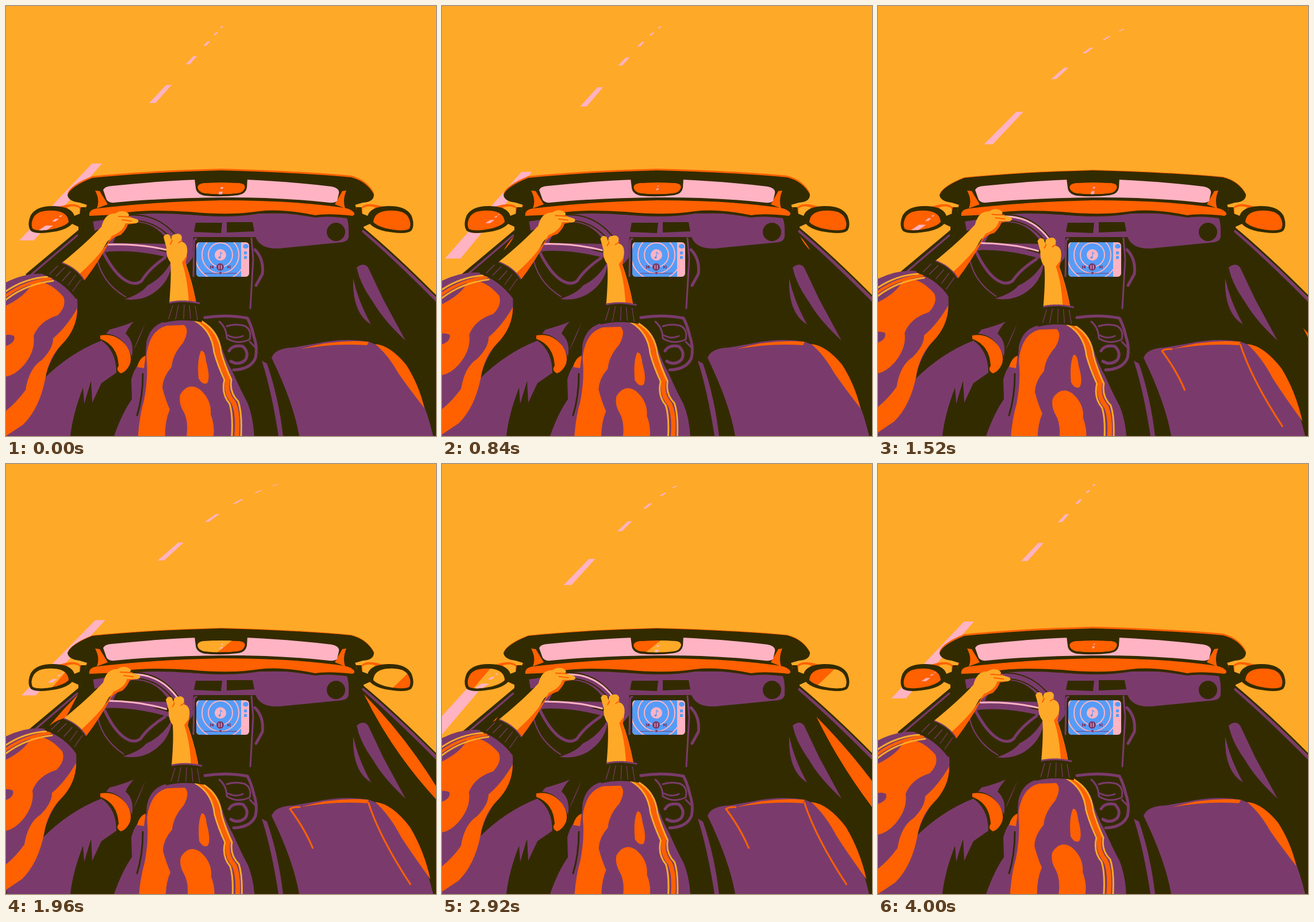
Recreate the animation shown at these times as an HTML page without scripts. Size 748 by 748 pixels, loop 4.04 s.

```html
<!DOCTYPE html>
<html lang="en">
<head>
<meta charset="utf-8">
<title>Evening drive</title>
<style>
/* a: dashes passed, b/c: road bend, s: steering, p: phase of the passing light */
@property --a { syntax: '<number>'; inherits: true; initial-value: 0; }
@property --b { syntax: '<number>'; inherits: true; initial-value: 0; }
@property --c { syntax: '<number>'; inherits: true; initial-value: 0; }
@property --s { syntax: '<number>'; inherits: true; initial-value: 0; }
@property --p { syntax: '<number>'; inherits: true; initial-value: 0; }

html, body { margin: 0; width: 100%; height: 100%; overflow: hidden; background: #ffa928; }
#stage {
  position: relative; width: 748px; height: 748px; overflow: hidden;
  animation: drive 4040ms infinite, steer 4040ms cubic-bezier(.37, 0, .63, 1) infinite, light 4040ms steps(20) infinite;
  --l: min(clamp(0, (var(--p) - .13) * 3.3, 1), (1 - var(--p)) * 10);
}
svg { position: absolute; left: 0; top: 0; display: block; }

@keyframes drive {
  0% { --a: 0; --b: 0; --c: 0; animation-timing-function: steps(21); }
  20.792% { --a: 3.054; --b: 0; --c: 4; animation-timing-function: steps(17); }
  37.623% { --a: 5.493; --b: 11.5; --c: 2; animation-timing-function: steps(11); }
  48.514% { --a: 6.99; --b: 18.5; --c: 1; animation-timing-function: steps(14); }
  62.376% { --a: 9.02; --b: 12.5; --c: 2; animation-timing-function: steps(21); }
  83.168% { --a: 11.757; --b: 0; --c: 3; animation-timing-function: steps(16); }
  99%, 100% { --a: 14; --b: 0; --c: 0; }
}
@keyframes steer {
  0%, 99%, 100% { --s: 0; }
  49.5% { --s: 1; }
}
/* five sweeps of 800 ms */
@keyframes light {
  0%, 19.8%, 39.6%, 59.4%, 79.2%, 99%, 100% { --p: 0; }
  19.795%, 39.595%, 59.395%, 79.195%, 98.995% { --p: 1; }
}

/* road dashes: z is the depth, u the near edge, v the far edge */
.dash {
  position: absolute; inset: 0; background: #ffb3c3;
  --z: calc(var(--n) + .97 - var(--a));
  --u: clamp(.3, var(--z) - .18, 6.2);
  --v: clamp(.3, var(--z) + .18, 6.2);
  --yu: calc(338 / var(--u) - 20);
  --yv: calc(338 / var(--v) - 20);
  --xu: calc(409 - .915 * var(--yu) + var(--b) * (var(--u) - 1) + var(--c) * (var(--u) + 6 / var(--u) - 6));
  --xv: calc(409 - .915 * var(--yv) + var(--b) * (var(--v) - 1) + var(--c) * (var(--v) + 6 / var(--v) - 6));
  clip-path: polygon(
    calc((var(--xu) - 10 / var(--u)) * 1px) calc(var(--yu) * 1px),
    calc((var(--xu) + 10 / var(--u)) * 1px) calc(var(--yu) * 1px),
    calc((var(--xv) + 10 / var(--v)) * 1px) calc(var(--yv) * 1px),
    calc((var(--xv) - 10 / var(--v)) * 1px) calc(var(--yv) * 1px));
}

.y { fill: #ffa928; } .o { fill: #ff6000; } .p { fill: #7a3b6c; }
.d { fill: #332b00; } .k { fill: #ffb3c3; } .b { fill: #559cf8; }
.line { fill: none; stroke: #7a3b6c; stroke-width: 5; stroke-linecap: round; stroke-linejoin: round; }
.sy { stroke: #ffa928; } .so { stroke: #ff6000; } .sd { stroke: #332b00; } .sk { stroke: #ffb3c3; } .sb { stroke: #559cf8; }
.w1 { stroke-width: 1.2; } .w2 { stroke-width: 2; } .w3 { stroke-width: 3; } .w8 { stroke-width: 8; }

#wheel { transform-origin: 235px 440px; transform: rotate(calc(var(--s) * 3deg)); }
#armL { transform: translate(calc(var(--s) * 3px), calc(var(--s) * -4px)); }
#sleeveL { transform: translate(calc(var(--s) * -2px), calc(var(--s) * -6px)); }
#armR { transform: translate(calc(var(--s) * 4px), calc(var(--s) * 8px)); }
#sleeveR { transform: translate(calc(var(--s) * 1px), calc(var(--s) * 8px)); }

#rim { transform: translateY(calc(var(--l) * 2px)); }
.lit { stroke-dasharray: 1 2; stroke-dashoffset: calc(1.05 - var(--l) * 1.05); stroke-linecap: butt; }
#crest { transform-origin: 642px 588px; transform: scale(calc(1 + var(--l) * .12), calc(1 + var(--l) * .2)); }
.glare { transform: translate(calc((var(--p) - .45) * 430px), calc((var(--p) - .45) * 20px)); }
.door {
  --gone: max(0, var(--p) - .57);
  transform-origin: 623px 401px;
  transform: translate(calc(var(--gone) * 354px), calc(var(--gone) * 483px)) scale(calc(min(var(--p), .57) * 6.8));
}
.away { animation: away 288.571ms steps(7) infinite; }
#backL { transform-origin: 104px 359px; }
#backC { transform-origin: 377px 309px; }
@keyframes away { to { transform: scale(.5); } }
</style>
</head>
<body>
<div id="stage">
<i class="dash" style="--n:0"></i><i class="dash" style="--n:1"></i><i class="dash" style="--n:2"></i>
<i class="dash" style="--n:3"></i><i class="dash" style="--n:4"></i><i class="dash" style="--n:5"></i>
<i class="dash" style="--n:6"></i><i class="dash" style="--n:7"></i><i class="dash" style="--n:8"></i>
<i class="dash" style="--n:9"></i><i class="dash" style="--n:10"></i><i class="dash" style="--n:11"></i>
<i class="dash" style="--n:12"></i><i class="dash" style="--n:13"></i><i class="dash" style="--n:14"></i>
<i class="dash" style="--n:15"></i><i class="dash" style="--n:16"></i><i class="dash" style="--n:17"></i>
<i class="dash" style="--n:18"></i><i class="dash" style="--n:19"></i><i class="dash" style="--n:20"></i>

<svg width="748" height="748" viewBox="0 0 748 748">
<defs>
  <path id="frame" d="M107 329Q112 314 150 299Q250 289 374 286Q500 289 600 298Q628 305 640 328Q640 341 621 342L607 346Q612 354 607 367L600 370Q560 364 538 368Q480 357 440 361Q390 370 320 363Q230 357 190 369L150 375L140 366Q137 354 141 346L128 342Q109 340 107 329Z"/>
  <path id="glass" d="M639 376Q640 358 664 356Q690 354 699 366Q706 377 702 387Q697 391 682 390Q650 387 639 376Z"/>
  <path id="leaf" class="o" d="M623 401Q652 430 675 472Q642 440 623 401Z"/>
  <clipPath id="inR"><use href="#glass"/></clipPath>
  <clipPath id="inL"><use href="#glass" transform="matrix(-1 0 0 1 748 0)"/></clipPath>
  <path id="rear" d="M333 315Q334 309 344 308Q374 306 406 308Q416 309 416 315Q414 325 402 326Q374 329 346 326Q334 324 333 315Z"/>
  <clipPath id="inC"><use href="#rear"/></clipPath>
  <clipPath id="inS"><rect x="331" y="411" width="78" height="60"/></clipPath>
  <clipPath id="inScreen"><rect x="331" y="411" width="92" height="60" rx="6"/></clipPath>
  <g id="side">
    <path class="o" d="M618 350Q626 342 644 346L660 350L634 366L620 364Z"/>
    <path class="y" d="M620 352Q628 346 642 350L632 366L620 364Z"/>
    <path class="d" d="M606 358Q618 360 629 365Q634 349 664 348Q695 347 705 364Q712 381 705 391Q697 397 674 394Q644 391 633 379L622 384L606 378Z"/>
    <use href="#glass" class="o"/>
  </g>
</defs>

<!-- cabin -->
<path class="d" d="M126 350V392L36 468L0 500V748H748V511L622 388V350Z"/>
<use href="#leaf" class="door"/>
<g transform="matrix(-1 0 0 1 748 0)"><use href="#leaf" class="door"/></g>
<path class="line" stroke-width="7" d="M622 392Q680 442 750 513"/>
<path class="line w3" d="M124 399L36 474"/>
<path class="line sd w3" d="M620 386Q680 436 750 507M128 390L36 467"/>

<!-- dashboard -->
<path class="p" d="M151 373Q250 355 300 362L374 366L440 361Q520 359 592 368Q597 375 596 402Q594 410 584 411L482 421Q444 426 434 402H331L324 440Q304 448 288 430L268 428L160 425Z"/>
<path class="d" d="M152 392L184 380L180 412L162 430H152ZM330 377H376L374 395L327 393ZM384 376H429L432 392L384 394Z"/>
<path class="d" d="M218 376Q262 374 285 414L186 412Q194 390 218 376Z"/>
<path class="d" d="M160 424H286L300 450L240 520L180 490Z"/>
<circle class="d" cx="574" cy="393" r="16"/>
<path class="d" d="M326 402H426L430 560H318Z"/>
<path class="p" d="M322 410L326 434Q318 452 296 462Q310 440 322 410Z"/>
<path class="line w3" d="M331 405Q328 404 327 412L326 470M427 404L430 440L425 526"/>
<path class="line" d="M433 424Q449 440 446 466L435 486"/>

<!-- screen -->
<g clip-path="url(#inScreen)">
  <rect class="k" x="331" y="411" width="92" height="60"/>
  <rect class="b" x="331" y="411" width="78" height="60"/>
  <g clip-path="url(#inS)" class="line sk w2">
    <circle cx="373" cy="433" r="21"/><circle cx="373" cy="433" r="32"/>
    <circle cx="373" cy="433" r="44"/>
  </g>
  <circle class="k" cx="373" cy="433" r="10"/>
  <path class="line sb w1" d="M373 437V428L376 431"/>
  <circle class="b" cx="371.500" cy="437.500" r="2"/>
  <path class="b" d="M412 418a5 4 0 0 1 10 0a5 4 0 0 1-10 0ZM414 427h5v5h-5ZM414 435h5v5h-5Z"/>
  <circle class="p" cx="372.500" cy="454" r="6.500"/>
  <path class="line sk w1" stroke-linecap="butt" d="M370.500 451V457M374.500 451V457"/>
  <path class="p" d="M361 451V457L356 454ZM355 451H356.500V457H355ZM385 451L389 454L385 457ZM389 451H390.500V457H389Z"/>
  <path class="line w1" d="M345 465H401"/>
  <circle class="p" cx="373" cy="464.500" r="2"/>
</g>

<!-- windscreen -->
<use id="rim" href="#frame" class="o" y="-3"/>
<use href="#frame" class="d"/>
<path class="o" d="M145 365Q143 354 160 352Q250 341 374 338Q500 338 588 351Q604 354 607 362L603 365Q560 360 538 364Q480 352 440 357Q390 365 320 358Q230 352 192 363Z"/>
<path class="o" d="M155 321L163 322L177 345L158 352Q164 338 155 321ZM592 321L585 322L572 345L590 352Q585 338 592 321Z"/>
<path class="k" d="M169 320Q171 314 184 313Q270 304 333 302H418Q500 306 566 314Q581 317 579 326L576 339Q572 343 562 342Q470 332 374 333Q270 334 188 342Q179 343 175 337Z"/>
<path class="d" d="M328 300H420L419 316Q417 327 404 329Q374 333 346 330Q331 327 330 316Z"/>
<g clip-path="url(#inC)">
  <use href="#rear" class="o"/>
  <path class="y glare" d="M310 290H414L360 334H256Z"/>
  <g id="backC" class="away k"><path d="M371 323H377L375 329H369ZM374 315H378L377 318H373Z"/></g>
</g>

<!-- door mirrors -->
<use href="#side"/>
<g clip-path="url(#inR)"><path class="y glare" d="M610 340H724L668 394H554Z"/></g>
<use href="#side" transform="matrix(-1 0 0 1 748 0)"/>
<g clip-path="url(#inL)">
  <path class="y glare" d="M8 340H122L76 394H-38Z"/>
  <g id="backL" class="away k">
    <path d="M69 382H82L68 392H54ZM86 370H92L86 375H80ZM95 364H98L95 367H92Z"/>
  </g>
</g>

<!-- wheel -->
<g id="wheel">
  <path class="p" d="M158 420Q220 412 286 430L285 438Q230 424 180 427L164 430Z"/>
  <path class="line" d="M170 430Q188 464 206 476Q224 488 236 478Q248 458 276 438"/>
  <path class="p" d="M289 442Q287 480 254 501Q232 514 207 510Q236 500 246 486Q274 472 289 442Z"/>
  <path class="line w2" d="M157 432Q164 480 208 506"/>
  <path class="line sk w3" d="M178 415Q232 413 278 424"/>
  <path class="line sd" style="stroke-width:12" d="M212 369Q264 364 298 410"/>
  <path class="line w8" d="M212 369Q264 364 298 410"/>
  <path class="line sk w3 lit" pathLength="1" d="M212 367Q266 362 300 408"/>
</g>

<!-- console, door pocket -->
<path class="line" d="M346 542Q385 536 420 543Q427 556 431 574Q438 594 434 612Q426 632 396 633"/>
<path class="line w3" d="M371 549Q384 560 384 578Q402 590 424 580Q428 562 414 556Q398 552 384 557M386 573Q400 580 412 574M424 584L434 594"/>
<path class="line" d="M388 600Q394 589 412 592Q424 604 416 616Q404 626 391 618"/>
<path class="p" d="M610 455Q622 445 630 455L656 510L695 582Q656 546 638 514Q616 484 610 455ZM604 474Q612 512 635 554Q602 534 604 474Z"/>

<!-- passenger seat -->
<path class="p" d="M462 612Q468 595 500 594L540 587Q590 577 630 584Q660 592 690 628Q726 674 743 748H510Q500 690 462 612ZM445 617L454 622Q474 680 482 748H474Q462 670 445 617Z"/>
<path class="o" d="M512 597Q570 579 631 584L628 590Q570 586 512 597Z"/>
<path id="crest" class="o" d="M642 588Q668 590 696 624Q718 658 728 700Q700 664 682 638Q664 606 642 588Z"/>
<path class="line so w3 lit" pathLength="1" d="M512 597Q500 596 494 600Q520 635 534 669"/>
<path class="line so w3 lit" pathLength="1" d="M630 588Q650 650 704 732"/>

<!-- legs -->
<path class="p" d="M0 748L64 650Q110 604 166 582Q192 600 192 638L166 656L150 690L148 652L136 692L134 664Q116 710 112 748Z"/>
<path class="p" d="M180 563Q206 556 222 549Q212 560 208 570Q224 584 219 610L208 590Q196 572 174 570ZM242 552Q230 578 221 600Q232 580 242 552Z"/>
<path class="o" d="M164 573Q192 568 210 592Q220 608 216 622Q210 636 200 639Q190 634 196 626Q194 590 164 579Z"/>
<path class="p" d="M218 650Q224 624 244 610L246 660L230 748H188Q202 708 219 684Z"/>
<path class="o" d="M228 628Q232 612 243 608L240 630Z"/>
<path class="line sd w3" d="M238 640Q238 680 228 712"/>

<!-- left arm -->
<g id="sleeveL">
  <path class="p" d="M-10 486Q30 463 66 466Q104 480 124 510Q127 550 108 574Q80 606 70 640Q62 690 34 726Q20 742 0 752H-10Z"/>
  <path class="o" d="M-10 526Q36 506 46 480Q74 476 100 506Q106 522 90 538Q58 548 48 574Q52 600 30 626Q10 648 -10 644V594Q18 588 14 574Q0 568 -10 578Z"/>
  <path class="o" d="M124 526Q124 562 96 590Q74 612 68 650Q58 700 30 728L0 748V704Q18 690 34 668Q40 630 62 616Q82 596 82 578Q104 560 124 526Z"/>
  <path class="line so" d="M-4 507Q30 480 78 474"/>
  <path class="line sy w3" d="M-4 499Q30 474 72 471M-4 514Q32 484 82 478"/>
</g>
<g id="armL">
  <path class="y" d="M97 447Q140 412 166 384Q172 360 190 361Q202 353 212 360Q216 364 212 366L228 371Q234 375 226 378L208 378Q204 392 190 398L176 410Q160 438 136 478Z"/>
  <path class="o" d="M226 378L208 378Q204 392 184 400Q168 430 128 466L136 478Q162 444 180 410Q186 402 200 398Q210 388 212 380Z"/>
  <path class="line so w2" d="M196 366L216 367M202 372L218 374"/>
  <path class="d" d="M64 467Q78 452 98 446Q124 456 137 477Q134 494 122 510Q98 478 64 467Z"/>
  <path class="line w2" d="M98 447Q124 457 136 477" stroke-dasharray="3 2"/>
  <path class="line w1" d="M90 452L76 466M102 455L87 470M112 462L98 478M121 468L108 486M130 476L116 496"/>
</g>

<!-- right arm -->
<g id="sleeveR">
  <path class="p" d="M244 586Q250 556 276 549Q310 544 340 547Q368 562 374 590Q382 616 394 636Q408 668 420 690Q432 720 432 760H228Q230 710 240 670Q242 620 244 586Z"/>
  <path class="o" d="M248 590Q256 562 280 556L310 555Q320 564 308 586Q290 606 288 628Q273 645 272 664Q277 684 285 702Q275 724 277 760H229Q231 716 240 686Q247 650 245 620Q243 604 248 590Z"/>
  <path class="o" d="M339 600Q346 598 348 618Q356 646 350 656Q342 660 335 648Q332 616 339 600ZM303 676Q316 654 336 666Q358 684 356 710Q366 736 358 760H312Q320 724 308 704Q300 690 303 676Z"/>
  <path class="line so w8" d="M334 547Q364 566 368 602Q374 624 386 648Q380 672 396 690Q406 712 400 760"/>
  <path class="line sy w3" d="M328 547Q358 564 362 602Q368 624 380 650Q374 674 389 692Q396 714 392 760M341 549Q370 566 374 602Q380 624 392 650Q388 672 404 688Q412 712 408 760"/>
</g>
<g id="armR">
  <path class="y" d="M274 402Q278 394 285 399L288 408Q286 398 294 397Q304 394 306 402L305 410Q317 412 315 430L312 446Q326 486 331 518L284 517Q288 470 286 446Q278 436 279 420Z"/>
  <path class="o" d="M315 434L312 448Q325 484 331 518H318Q316 474 306 446Z"/>
  <path class="line so w2" d="M289 408L286 414M306 408L300 412"/>
  <path class="d" d="M283 517Q308 509 338 517L341 550Q306 543 274 551Z"/>
  <path class="line w3" d="M285 516Q308 511 336 517" stroke-dasharray="3 2"/>
  <path class="line w1" d="M290 521L283 544M300 520L295 545M310 520L309 544M319 521L321 544M329 522L333 546"/>
</g>
</svg>
</div>
</body>
</html>
```
